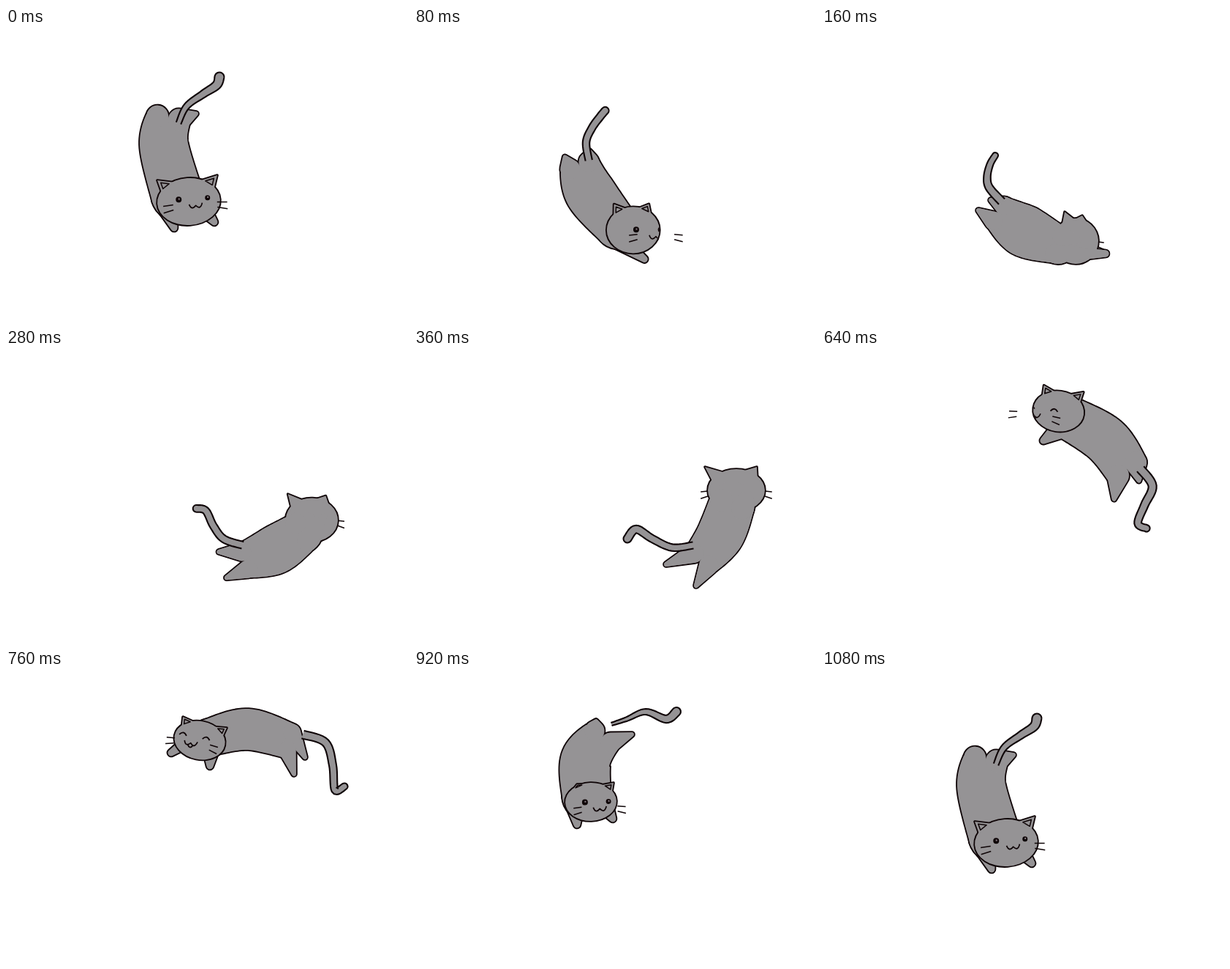
Write an HTML page with a canvas that moves like this. It is 550 px wide and 400 px high and loops after 1120 ms.

```html
<!DOCTYPE html>
<html lang="en">
<head>
<meta charset="utf-8">
<title>Cat running in a circle</title>
<style>
html, body { margin: 0; width: 100%; height: 100%; overflow: hidden; background: #fff; }
canvas { display: block; }
</style>
</head>
<body>
<canvas id="stage" width="550" height="400"></canvas>
<script>
const ctx = document.getElementById('stage').getContext('2d');
const LOOP = 1120, STEP = 40, TURN = Math.PI * 2;
const FUR = '#959395', INK = '#0e0406', EDGE = 1.8;

const add = (a, b) => [a[0] + b[0], a[1] + b[1]];
const sub = (a, b) => [a[0] - b[0], a[1] - b[1]];
const scale = (p, k) => [p[0] * k, p[1] * k];
const mix = (a, b, u) => add(a, scale(sub(b, a), u));
const angleOf = ([x, y]) => Math.atan2(y, x);
const spin = ([x, y], a) => [x * Math.cos(a) - y * Math.sin(a), x * Math.sin(a) + y * Math.cos(a)];

// spine runs rump to neck; feet are hind then front, outer side first;
// look is the shift of the eyes; sizes: body half widths, tail base and tip, head radii
const poses = [
  { time: 0, spine: [[222,123], [216,160], [234,228]], feet: [[208,111], [260,117], [230,273], [285,265]],
    tail: [[236,130], [247,107], [270,90], [288,78], [292,67]],
    head: [250,237], ears: [[207,208], [289,201]], look: [6,-4], sizes: [30, 33, 35, 7, 13, 43, 32] },
  { time: 160, spine: [[242,253], [277,277], [323,296]], feet: [[214,249], [231,235], [388,308], [350,290]],
    tail: [[246,237], [229,218], [226,203], [230,186], [237,174]],
    head: [347,291], ears: [[332,251], [356,256]], look: [30,2], sizes: [25, 35, 26, 11, 8, 31, 31] },
  { time: 360, spine: [[393,287], [419,254], [435,212]], feet: [[386,323], [345,294], [450,200], [420,200]],
    tail: [[382,268], [353,271], [326,259], [304,246], [292,259]],
    head: [441,193], ears: [[398,161], [469,161]], look: [0,0], sizes: [26, 32, 31, 9, 11, 39, 29] },
  { time: 520, spine: [[431,221], [429,184], [406,128]], feet: [[459,239], [399,252], [425,115], [354,126]],
    tail: [[441,226], [439,248], [418,261], [406,276], [407,291]],
    head: [400,110], ears: [[380,73], [430,74]], look: [-30,0], sizes: [35, 37, 34, 11, 10, 35, 29] },
  { time: 760, spine: [[388,97], [331,81], [278,92]], feet: [[409,119], [394,142], [226,113], [279,131]],
    tail: [[406,88], [437,99], [447,130], [450,164], [463,159]],
    head: [265,96], ears: [[242,64], [302,79]], look: [-7,-5], sizes: [24, 28, 25, 11, 9, 35, 26] },
  { time: 920, spine: [[258,91], [235,123], [236,172]], feet: [[249,70], [298,88], [223,211], [272,203]],
    tail: [[270,74], [291,67], [317,57], [345,67], [359,57]],
    head: [242,180], ears: [[223,156], [273,154]], look: [8,0], sizes: [27, 34, 33, 4, 12, 35, 26] }
];

// settle close to the first pose before the loop restarts
const nudge = p => add(p, [2, -1]), first = poses[0];
poses.push({ ...first, time: 1080, spine: first.spine.map(nudge), feet: first.feet.map(nudge),
  tail: first.tail.map(nudge), head: nudge(first.head), ears: first.ears.map(nudge) });

// each pose becomes a vector in the cat's own turning frame; the head stays upright
let lastAngle = Infinity;
const keys = poses.map(p => {
  const c = p.spine[1];
  let a = angleOf(sub(p.spine[2], p.spine[0]));
  while (a > lastAngle) a -= TURN;
  lastAngle = a;
  const turned = [...p.spine, ...p.feet, ...p.tail, p.head].map(q => spin(sub(q, c), -a));
  const upright = [...p.ears.map(e => sub(e, p.head)), p.look];
  return { time: p.time, v: [a, ...c, ...[...turned, ...upright].flat(), ...p.sizes] };
});

function keyAt(i) {
  const n = keys.length, lap = Math.floor(i / n), k = keys[i - lap * n];
  return { time: k.time + lap * LOOP, v: [k.v[0] - lap * TURN, ...k.v.slice(1)] };
}

function poseAt(t) {
  let i = keys.length - 1;
  while (keys[i].time > t) i--;
  const [a, b, c, d] = [-1, 0, 1, 2].map(k => keyAt(i + k));
  const span = c.time - b.time, u = (t - b.time) / span, w = 1 - u;
  const v = b.v.map((x, k) => {
    const m = (c.v[k] - a.v[k]) / (c.time - a.time) * span;
    const n = (d.v[k] - x) / (d.time - b.time) * span;
    return x * (1 + 2 * u) * w * w + c.v[k] * u * u * (3 - 2 * u) + m * u * w * w - n * u * u * w;
  });
  const angle = v.shift(), centre = v.splice(0, 2);
  const take = n => Array.from({ length: n }, () => v.splice(0, 2));
  const turned = n => take(n).map(p => add(spin(p, angle), centre));
  const spine = turned(3), feet = turned(4), tail = turned(5), [head] = turned(1);
  const ears = take(2), [look] = take(1);
  return { spine, feet, tail, head, ears, look, sizes: v };
}

function spline(pts, u) {
  const n = pts.length - 1, s = u * n, i = Math.min(n - 1, Math.floor(s)), f = s - i;
  const [a, b, c, d] = [-1, 0, 1, 2].map(o => pts[Math.max(0, Math.min(n, i + o))]);
  return b.map((x, k) => x + f * (c[k] - a[k] + f * (2 * a[k] - 5 * x + 4 * c[k] - d[k]
    + f * (3 * (x - c[k]) + d[k] - a[k]))) / 2);
}

function line(pts) {
  const path = new Path2D();
  pts.forEach(p => path.lineTo(...p));
  return path;
}

// band along a curve with a round far end, open at the start
function ribbon(pts, radii) {
  const N = 36, left = [], right = [];
  let end, dir;
  for (let j = 0; j <= N; j++) {
    const u = j / N, r = spline(radii.map(x => [x]), u)[0];
    end = spline(pts, u);
    dir = angleOf(sub(spline(pts, Math.min(1, u + 0.01)), spline(pts, Math.max(0, u - 0.01))));
    const off = spin([0, r], dir);
    left.push(sub(end, off));
    right.unshift(add(end, off));
  }
  const path = line(left);
  path.arc(...end, radii[radii.length - 1], dir - TURN / 4, dir + TURN / 4);
  right.forEach(p => path.lineTo(...p));
  return path;
}

// hull of two circles
function limb(base, r0, tip, r1) {
  const d = sub(tip, base), a = angleOf(d);
  const b = Math.acos(Math.min(1, (r0 - r1) / Math.hypot(...d)));
  const path = new Path2D();
  path.arc(...base, r0, a + b, a - b + TURN);
  path.arc(...tip, r1, a - b, a + b);
  path.closePath();
  return path;
}

function stroke(path, width) {
  ctx.lineWidth = width;
  ctx.strokeStyle = INK;
  ctx.stroke(path);
}

function fill(path, color = FUR) {
  ctx.fillStyle = color;
  ctx.fill(path);
}

// shapes share one outline
function merged(shapes) {
  shapes.forEach(s => stroke(s, EDGE * 2));
  shapes.forEach(s => fill(s));
}

function bodyShapes({ spine, feet, sizes }) {
  const widths = sizes.slice(0, 3), [rump, mid, neck] = spine;
  const limbs = feet.map((tip, i) => {
    const hind = i < 2, side = i % 2 ? -0.5 : 0.5, w = hind ? widths[0] : widths[2];
    const dir = angleOf(hind ? sub(mid, rump) : sub(neck, mid));
    const root = add(hind ? rump : neck, spin([0, w * side], dir));
    return limb(root, w / 2, tip, hind ? 3 : 4.5);
  });
  const trunk = ribbon(spine, widths);
  trunk.closePath();
  return [trunk, ...limbs];
}

function earAt(tip, rx, ry, tilt) {
  const [x, y] = spin(tip, -tilt), a = Math.atan2(y / ry, x / rx);
  const base = b => spin([rx * Math.cos(b) * 0.96, ry * Math.sin(b) * 0.96], tilt);
  return [base(a - 0.3), tip, base(a + 0.3)];
}

function drawEye(x, y, r, closed) {
  const eye = new Path2D();
  if (closed) {
    eye.moveTo(x - 5, y + 1);
    eye.quadraticCurveTo(x, y - 6, x + 5, y + 1);
    stroke(eye, 1.8);
  } else {
    eye.arc(x, y, r, 0, TURN);
    fill(eye, INK);
    ctx.fillStyle = '#8b8288';
    ctx.fillRect(x - 0.5, y - 1.8, 2, 2);
  }
}

function drawMouth(x, y, open) {
  const path = new Path2D();
  path.moveTo(x - 9, y - 2);
  path.quadraticCurveTo(x - 6, y + 7, x, y);
  path.quadraticCurveTo(x + 6, y + 7, x + 9, y - 3);
  if (open) {
    path.moveTo(x - 4, y + 2);
    path.quadraticCurveTo(x, y + 10, x + 4, y + 2);
  }
  stroke(path, 1.7);
}

function drawWhiskers(x, y, from, to, sides) {
  for (const s of sides)
    for (const dy of [-3, 4])
      stroke(line([[x + s * from, y + dy], [x + s * to, y + dy * 1.3 + 2]]), 1.5);
}

function drawHead({ head, ears, look, sizes }, trunk, facing, closed) {
  const [rx, ry] = sizes.slice(5);
  const tilt = angleOf(sub(ears[1], ears[0])) * 0.8;
  const tips = ears.map(e => earAt(e, rx, ry, tilt));
  const skull = new Path2D();
  skull.ellipse(0, 0, rx, ry, tilt, 0, TURN);
  const flaps = tips.map(line);
  flaps.forEach(f => f.closePath());

  ctx.save();
  ctx.translate(...head);
  merged([skull, ...flaps]);
  if (facing) {
    for (const tri of tips) {
      const mid = scale(tri.reduce(add), 1 / 3);
      const inner = line(tri.map(p => mix(mid, p, 0.5)));
      inner.closePath();
      stroke(inner, 1.5);
    }
    const mouth = add(look, [look[0] * 0.5, 9.5]);
    ctx.save();
    ctx.clip(skull);
    ctx.translate(...look);
    ctx.rotate(tilt);
    drawEye(-rx * 0.46, 0, 4, closed);
    drawEye(rx * 0.46, 0, 3.5, closed);
    drawMouth(look[0] * 0.5, 9.5, closed);
    ctx.restore();
    ctx.translate(...mouth);
    ctx.rotate(tilt);
    drawWhiskers(0, 0, rx * 0.7, rx * 1.02, [-1, 1]);
  } else {
    drawWhiskers(0, 4, rx, rx * 1.25, [-1, 1].filter(s => s * look[0] > -10));
  }
  ctx.restore();
  if (!facing) trunk.forEach(s => fill(s));
}

function draw(t) {
  const cat = poseAt(t), trunk = bodyShapes(cat);
  const facing = t < 120 || t >= 600, closed = t >= 600 && t < 840;
  ctx.fillStyle = '#fff';
  ctx.fillRect(0, 0, 550, 400);
  ctx.lineJoin = 'round';
  merged(trunk);
  drawHead(cat, trunk, facing, closed);
  const tail = ribbon(cat.tail, cat.sizes.slice(3, 5).map(w => w / 2));
  fill(tail);
  stroke(tail, 2.1);
}

const start = performance.now();
function tick() {
  const t = Math.max(0, performance.now() - start) % LOOP;
  draw(Math.floor(t / STEP) * STEP);
  requestAnimationFrame(tick);
}
tick();
</script>
</body>
</html>
```
